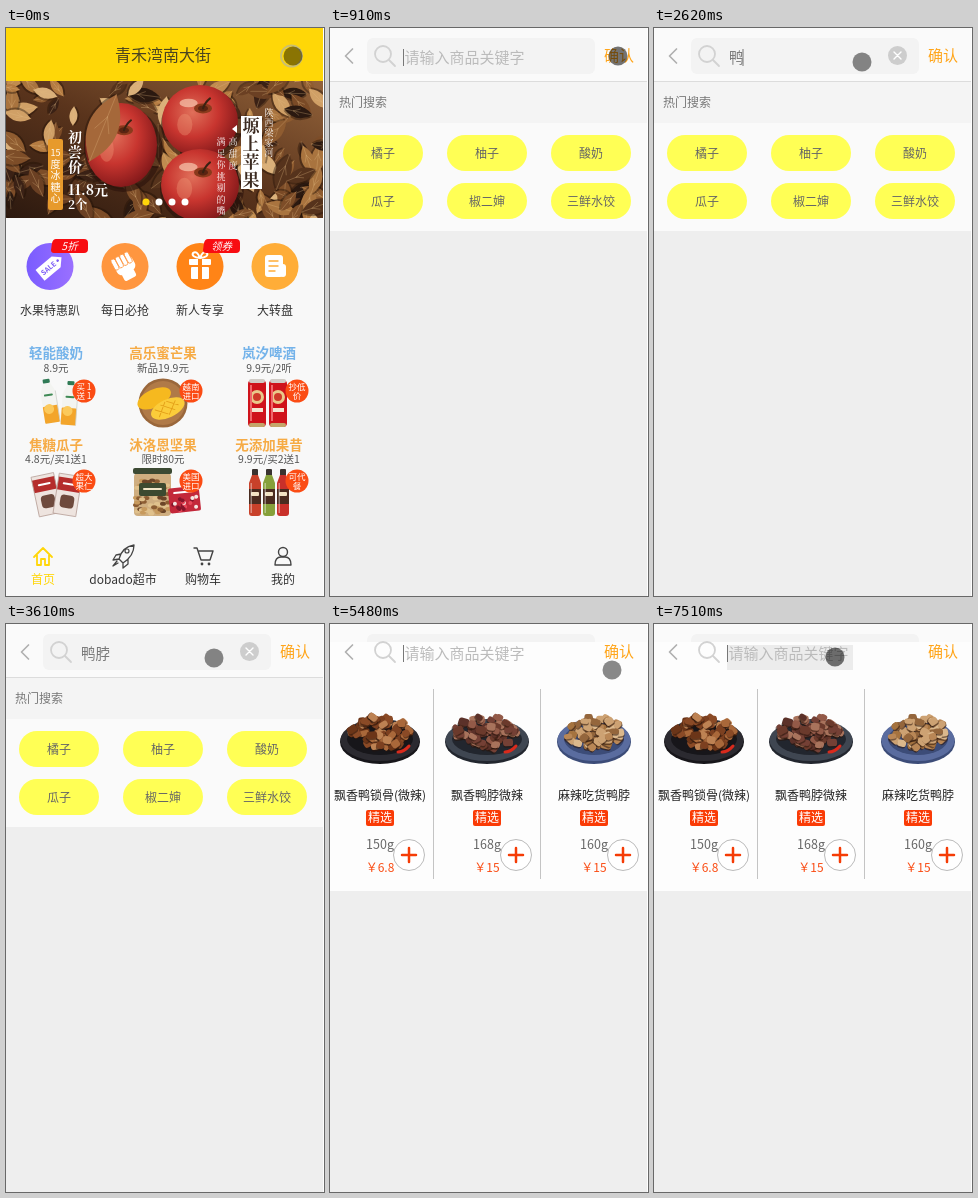
Write an HTML page that moves like this. It is 318 px wide and 568 px high and loops after 8000 ms.

```html
<!DOCTYPE html>
<html lang="zh-CN">
<head>
<meta charset="utf-8">
<style>
html, body { margin: 0; width: 100%; height: 100%; overflow: hidden; background: #eee; }
svg { display: block; width: 318px; height: 568px; font-family: "Noto Sans CJK SC", "Noto Sans CJK", "Noto Sans", sans-serif; }
.serif { font-family: "Noto Serif CJK SC", "Noto Sans CJK SC", "Noto Serif", serif; }
</style>
</head>
<body>
<svg id="stage" viewBox="0 0 318 568"></svg>
<script>
let seed = 7;
const rnd = (a = 0, b = 1) => {
  seed = (seed * 16807) % 2147483647;
  return a + (b - a) * seed / 2147483647;
};
const pick = list => list[Math.floor(rnd(0, list.length))];
const times = (n, fn) => Array.from({ length: n }, (_, i) => fn(i)).join('');

const rect = (x, y, w, h, fill, r = 0, more = '') =>
  `<rect x="${x}" y="${y}" width="${w}" height="${h}" rx="${r}" fill="${fill}" ${more}/>`;
const oval = (x, y, rx, ry, fill, more = '') =>
  `<ellipse cx="${x}" cy="${y}" rx="${rx}" ry="${ry}" fill="${fill}" ${more}/>`;
const disc = (x, y, r, fill, more) => oval(x, y, r, r, fill, more);
const line = (d, color, w = 1.5, fill = 'none') =>
  `<path d="${d}" fill="${fill}" stroke="${color}" stroke-width="${w}" stroke-linecap="round" stroke-linejoin="round"/>`;
const shape = (d, fill) => `<path d="${d}" fill="${fill}"/>`;
// y is the vertical middle of the glyphs
const text = (s, x, y, size, fill, more = '', anchor = 'middle') =>
  `<text x="${x}" y="${y + size * 0.37}" font-size="${size}" fill="${fill}" text-anchor="${anchor}" ${more}>${s}</text>`;
const column = (s, x, y, size, step, fill, more) =>
  [...s].map((c, i) => text(c, x, y + i * step, size, fill, more)).join('');
const turn = (angle, x, y, body) => `<g transform="rotate(${angle} ${x} ${y})">${body}</g>`;
const group = (id, body) => `<g id="${id}">${body}</g>`;

function leaf(x, y, len, angle, fill) {
  const w = len * 0.42;
  return `<g transform="translate(${x} ${y}) rotate(${angle})">` +
    shape(`M${-len} 2Q0 ${-w * 2 + 2} ${len} 2Q0 ${w * 2 + 2} ${-len} 2Z`, '#1d0e0666') +
    shape(`M${-len} 0Q0 ${-w * 2} ${len} 0Q0 ${w * 2} ${-len} 0Z`, fill) +
    line(`M${-len} 0H${len}M${-len / 3} 0l${w} ${-w / 2}M${-len / 3} 0l${w} ${w / 2}`, '#e2b98066', 0.7) + '</g>';
}

function apple(x, y, rx, ry) {
  return oval(x + 2, y + 4, rx + 3, ry + 1, '#2a120a99') + oval(x, y, rx, ry, 'url(#apple)') +
    oval(x - rx * 0.4, y + ry * 0.1, rx * 0.2, ry * 0.3, '#f2a27e55') +
    oval(x - rx * 0.3, y - ry * 0.5, rx * 0.24, ry * 0.12, '#f9cdb4aa') +
    oval(x + 3, y - ry * 0.35, 9, 5, '#8a3a1c') + oval(x + 3, y - ry * 0.35, 5, 3, '#5a2412') +
    line(`M${x + 3} ${y - ry * 0.35}q2 -6 7 -10`, '#3a2212', 2);
}

function banner() {
  const serif = 'class="serif"';
  const bold = serif + ' font-weight="700"';
  const pale = ['#c08c50', '#d0a066', '#a9743f', '#dab07a', '#8f5c30', '#7a4a26', '#b57c42'];
  const dark = ['#3a2115', '#56331c', '#6b4023', '#2b1910', '#7d4d28'];
  const leaves = times(190, () => {
    const x = rnd(-5, 322), y = rnd(48, 195);
    return leaf(x, y, rnd(8, 19), rnd(0, 360), pick(x < 150 && y > 130 ? dark : pale.concat(dark)));
  });
  return `<g clip-path="url(#bannerClip)">` + rect(0, 53, 317, 137, 'url(#soil)') + leaves +
    apple(115, 117, 36, 42) + leaf(97, 100, 36, 112, '#a5683a') +
    apple(194, 93, 38, 36) + apple(194, 157, 39, 36) + '</g>' +
    column('初尝价', 69, 109, 14, 15, '#fff', bold) +
    rect(42, 111, 15, 71, '#e79a2c', 2) +
    text('15', 49.5, 125, 9, '#fff') + column('度冰糖心', 49.5, 136, 10, 11.5, '#fff') +
    text('11.8元', 62, 162, 14, '#fff', bold, 'start') +
    text('2个', 62, 177, 12, '#fff', bold, 'start') +
    rect(235, 88, 21, 73, '#fff') +
    column('塬上苹果', 245, 98, 17, 18, '#3b2a20', bold) +
    column('陕西梁家河', 263, 85, 9, 10, '#fff', serif) +
    column('高甜度', 227, 114, 9, 12, '#fff', serif) +
    column('满足你挑剔的嘴', 215, 114, 9, 11.5, '#fff', serif) +
    shape('M226 101l5 -4v8z', '#fff') +
    times(4, i => disc(140 + 13 * i, 174, 3.5, i ? '#fff' : '#ffd60a'));
}

function menu() {
  const items = [['水果特惠趴', 'url(#violet)'], ['每日必抢', '#ff963f'], ['新人专享', '#ff8417'], ['大转盘', '#ffad38']];
  const flag = (s, x) => shape(`M${x + 5} 211h28q4 0 4 4v6q0 4 -4 4h-30q-3 0 -3 -3l1 -7q1 -4 4 -4z`, '#f80d12') +
    text(s, x + 18.5, 218.5, 10.5, '#fff', 'font-style="italic"');
  return items.map(([name, fill], i) =>
    disc(44 + 75 * i, 238.5, 23.5, fill) + text(name, 44 + 75 * i, 283, 12, '#333')).join('') +
    turn(-40, 44, 239, shape('M31 232h21l7 7l-7 7h-21z', '#fff') +
      text('SALE', 42, 239, 7, '#7d5cf5', 'font-weight="700"') + disc(54, 239, 1.3, '#7d5cf5')) +
    turn(-28, 119, 238, rect(109, 230, 20, 15, '#fff', 5) +
      times(4, i => rect(108.5 + i * 5, 226, 4.6, 12, '#fff', 2.3, 'stroke="#ff963f" stroke-width=".8"')) +
      rect(112, 243, 13, 9, '#fff', 2)) +
    rect(183, 231, 22, 6, '#fff', 1) + rect(185, 239, 18, 12, '#fff', 1) + rect(192, 231, 4, 20, '#ff8417') +
    line('M194 230q-9 -1 -7 -5q4 -3 7 5q3 -8 7 -5q2 4 -7 5', '#fff', 2) +
    rect(259, 227, 18, 22, '#fff', 3) + rect(274, 236, 6, 13, '#fff', 3) +
    line('M263 233h9M263 238h9M263 243h6', '#ffad38', 1.4) +
    flag('5折', 45) + flag('领券', 197);
}

function pictures() {
  const carton = (x, y, angle) => turn(angle, x + 7, y + 20,
    shape(`M${x} ${y + 10}l4 -9h7l4 9v31h-15z`, '#f3f4f1') + rect(x + 4, y - 3, 7, 4, '#2f7a55', 1) +
    rect(x, y + 24, 15, 17, '#f3a52b', 1) + disc(x + 6, y + 27, 5, '#fbc95c') +
    line(`M${x + 4} ${y + 13}h7`, '#3f8a55', 2) + line(`M${x + 15} ${y + 10}v31`, '#cfd2cc', 0.8));
  const can = x => rect(x, 352, 18, 47, '#cf131b', 4) + rect(x + 1, 351, 16, 4, '#d0ccc6', 2) +
    disc(x + 9, 369, 7, '#e9c98a') + disc(x + 9, 369, 4, '#cf3a2a') + rect(x + 3, 380, 12, 4, '#f4e6d2') +
    rect(x + 1, 395, 16, 4, '#c4a66a', 2) + rect(x + 2, 357, 2, 36, '#f0666a');
  const bag = (x, angle) => turn(angle, x + 11, 467, rect(x, 447, 23, 40, '#eee4df', 2) +
    rect(x, 450, 23, 13, '#b52d2c') + rect(x + 5, 467, 14, 13, '#6e4a3d', 4) +
    line(`M${x + 6} 456h11`, '#fff', 2) + line(`M${x} 447v40h23v-40z`, '#b9a29a', 0.8));
  const bottle = (x, fill) => rect(x + 3, 441, 6, 7, '#3a3330', 1) +
    shape(`M${x + 3} 447h6l3 8v30q0 3 -3 3h-6q-3 0 -3 -3v-30z`, fill) +
    rect(x, 461, 12, 15, '#4a2c20') + rect(x + 2, 464, 8, 4, '#f2e3c4', 1) + rect(x + 1.5, 455, 1.5, 30, '#ffffff66');
  const nuts = times(60, () => oval(rnd(130, 163), rnd(452, 486), 3, 2, pick(['#c79a5e', '#8c5d33', '#e0c18c', '#6c4528'])));
  return carton(36, 354, -9) + carton(56, 356, 4) +
    disc(157, 375, 24.5, '#9a673b') + disc(157, 375, 22, '#b07a48') +
    turn(-25, 157, 375, oval(151, 367, 18, 9, '#f6b91f') + oval(159, 382, 18, 9, '#fbcc3a') +
      line('M147 378l10 9M154 376l11 10M161 375l9 8M148 386l11 -11M158 388l11 -10', '#e39f18', 0.9)) +
    can(242) + can(263) + bag(29, -12) + bag(50, 9) +
    rect(128, 445, 37, 43, '#cfae80', 4) + rect(127, 440, 39, 6, '#3c4a33', 2) + nuts +
    rect(133, 455, 27, 13, '#3d4a30', 2) + line('M138 461h17', '#f2e6c8', 2) +
    turn(-6, 179, 472, rect(163, 459, 31, 25, '#c3283a', 2) +
      times(22, () => disc(rnd(166, 191), rnd(469, 482), 2, pick(['#e8485a', '#86142a', '#f3e6e2']))) +
      line('M169 464h18', '#fff', 2)) +
    bottle(243, '#c8412a') + bottle(257, '#86a03a') + bottle(271, '#c9302a');
}

function goods() {
  const blue = '#74b3ea', gold = '#f6ab45';
  const rows = [
    [325, 340, 363, [[50, '轻能酸奶', '8.9元', '买 1', '送 1', blue], [157, '高乐蜜芒果', '新品19.9元', '越南', '进口', gold], [263, '岚汐啤酒', '9.9元/2听', '抄低', '价', blue]]],
    [417, 431, 453, [[50, '焦糖瓜子', '4.8元/买1送1', '超大', '果仁', gold], [157, '沐洛恩坚果', '限时80元', '美国', '进口', gold], [263, '无添加果昔', '9.9元/买2送1', '可代', '餐', gold]]]
  ];
  return pictures() + rows.map(([y1, y2, y3, cells]) => cells.map(([x, name, price, a, b, color]) =>
    text(name, x, y1, 13.5, color, 'font-weight="700"') + text(price, x, y2, 10.5, '#555') +
    disc(x + 28, y3, 11.5, '#fb4c14') + text(a, x + 28, y3 - 4.5, 8.5, '#fff') + text(b, x + 28, y3 + 4.5, 8.5, '#fff')
  ).join('')).join('');
}

function tabs() {
  const ink = '#444';
  return ['首页', 'dobado超市', '购物车', '我的'].map((s, i) =>
    text(s, 37 + 80 * i, 552, 12, i ? '#333' : '#ffd60a')).join('') +
    line('M28 529l9 -9l9 9M31 527v10h4v-6h4v6h4v-10', '#ffd60a', 1.8) +
    line('M113 531q3 -12 15 -14q0 11 -11 18zM115 526l-5 1l-3 5l6 -1M122 531l0 5l-5 4l0 -5M111 533l-4 5l5 -3', ink, 1.3) +
    disc(121, 523, 2, 'none', `stroke="${ink}" stroke-width="1.2"`) +
    line('M188 520h3l4 12h9l3 -9h-14', ink, 1.4) + disc(196, 536, 1.4, ink) + disc(203, 536, 1.4, ink) +
    disc(277, 524, 4.5, 'none', `stroke="${ink}" stroke-width="1.4"`) +
    line('M269 537q0 -8 6 -8h4q6 0 6 8z', ink, 1.4);
}

function home() {
  return rect(0, 0, 318, 568, '#f8f8f8') + rect(0, 0, 317, 53, '#ffd707') +
    text('青禾湾南大街', 157, 27, 16, '#4a4420') +
    disc(285.5, 28, 10.5, 'none', 'stroke="#cbbf70" stroke-width="2"') +
    banner() + menu() + goods() + tabs();
}

function hotList() {
  const words = ['橘子', '柚子', '酸奶', '瓜子', '椒二婶', '三鲜水饺'];
  return rect(0, 53, 317, 1, '#dcdcdc') + rect(0, 54, 317, 41, '#f4f4f4') + rect(0, 95, 317, 108, '#fafafa') +
    text('热门搜索', 9, 75, 12, '#777', '', 'start') +
    words.map((w, i) => {
      const x = 13 + 104 * (i % 3), y = i < 3 ? 107 : 155;
      return rect(x, y, 80, 36, '#ffff55', 18) + text(w, x + 40, y + 19, 12, '#666');
    }).join('');
}

function dish(x, rx, plate, rim, colors, chili) {
  const chunks = times(75, i => {
    const a = rnd(0, 6.283), k = Math.sqrt(rnd());
    const cx = x + Math.cos(a) * k * rx * 0.74, cy = 108 + Math.sin(a) * k * 16;
    const w = rnd(7, 11), h = rnd(5, 8);
    return turn(rnd(-50, 50), cx, cy, rect(cx - w / 2, cy - h / 2 + 1.5, w, h, '#2a140c88', 2.5) +
      rect(cx - w / 2, cy - h / 2, w, h, pick(colors), 2.5));
  });
  return oval(x, 118, rx, 22, rim) + oval(x, 116, rx - 0.5, 21, plate) + oval(x, 115, rx - 7, 16, rim) + chunks +
    (chili ? line(`M${x + 18} 128q6 0 11 -6`, '#d92a1c', 3) : '');
}

function results() {
  const cells = [
    ['飘香鸭锁骨(微辣)', '150g', '6.8', 40, '#2b2a30', '#17161a', ['#8a4a26', '#6b3518', '#a9683a', '#7c4020', '#bd8253'], true],
    ['飘香鸭脖微辣', '168g', '15', 42, '#3f4651', '#22262e', ['#744035', '#5b3129', '#935a48', '#6b3a2c', '#a8735c'], true],
    ['麻辣吃货鸭脖', '160g', '15', 37, '#5a6c9f', '#3c4c78', ['#b98756', '#94663c', '#cda273', '#a5733f', '#dbb88c'], false]
  ];
  return rect(0, 54, 317, 213, '#fdfdfd') +
    cells.map(([name, weight, price, rx, plate, rim, colors, chili], i) => {
      const x = 50 + 107 * i;
      return dish(x, rx, plate, rim, colors, chili) +
        text(name, x, 172, 12, '#222') +
        rect(x - 14, 186, 28, 16, '#fa3b06', 2) + text('精选', x, 194, 12, '#fff') +
        text(weight, x, 220, 12.5, '#666') + text('￥' + price, x, 244, 12, '#fa4b12') +
        disc(x + 29, 231, 15.5, '#fff', 'stroke="#bbb"') +
        line(`M${x + 22} 231h14M${x + 29} 224v14`, '#f53c06', 2.5) +
        (i < 2 ? rect(x + 53, 65, 1, 190, '#c4c4c4') : '');
    }).join('');
}

const emptyNote = () =>
  text('喵~ 这是啥 T.T 你再搜搜~', 163, 285, 12, '#888') +
  rect(109, 329, 96, 36, '#f2e40e', 18) + text('点我逛嗨', 157, 347.5, 15, '#fff');

const search = () =>
  rect(0, 0, 318, 568, '#eee') + rect(0, 0, 317, 53, '#fafafa') + rect(37, 10, 228, 36, '#f3f3f3', 6) +
  group('hot', hotList()) + group('empty', emptyNote()) +
  group('results', rect(0, 18, 317, 40, '#fdfdfd') + results()) +
  group('tap', rect(73, 21, 126, 25, '#ececec')) +
  line('M22.5 21l-7 7l7 7', '#b0b0b0', 1.7) +
  disc(53, 26, 8, 'none', 'stroke="#d2d2d2" stroke-width="1.8"') + line('M59 32l6 6', '#d2d2d2', 1.8) +
  text('确认', 289, 27, 15, '#ffa51a') +
  group('hint', text('请输入商品关键字', 74.5, 29.5, 15, '#bbb', 'font-weight="300"', 'start')) +
  `<text id="query" x="75" y="34.5" font-size="14.5" fill="#777" font-weight="300"></text>` +
  group('clear', disc(243.5, 27.5, 9.5, '#cdcdcd') + line('M240 24l7 7M247 24l-7 7', '#fff', 1.4)) +
  rect(73, 21, 1, 17, '#777', 0, 'id="caret"');

const stop = (at, color) => `<stop offset="${at}" stop-color="${color}"/>`;
const $ = id => document.getElementById(id);
$('stage').innerHTML = `<defs>
  <clipPath id="bannerClip"><rect y="53" width="317" height="137"/></clipPath>
  <linearGradient id="soil" x1="0" y1="1" x2="1" y2="0">${stop(0, '#2c190f') + stop(0.5, '#5a341c') + stop(1, '#93633a')}</linearGradient>
  <radialGradient id="apple" cx=".4" cy=".38" r=".68">${stop(0, '#e0705a') + stop(0.5, '#c8352f') + stop(1, '#7d1618')}</radialGradient>
  <linearGradient id="violet">${stop(0, '#7a5cff') + stop(1, '#9a70ff')}</linearGradient>
  </defs>` + group('home', home()) + group('search', search()) +
  rect(317, 0, 1, 568, '#fff') + disc(0, 0, 9.5, '#000', 'id="pointer"');

// each step: time, then only what changes
const steps = [
  [0, { page: 'home', query: '', caret: 0, at: [287, 28], press: 0 }],
  [510, { press: 1 }],
  [910, { page: 'hot', caret: 1, at: [288, 28] }],
  [1170, { caret: 0, at: [288, 37], press: 0 }],
  [1290, { at: [250, 37] }],
  [1420, { at: [208, 34] }],
  [1670, { caret: 1 }],
  [2120, { caret: 0 }],
  [2620, { query: '鸭', caret: 1 }],
  [3050, { query: '鸭脖' }],
  [3610, { caret: 0 }],
  [3860, { at: [238, 33] }],
  [3980, { at: [296, 39] }],
  [4120, { at: [294, 37], caret: 1 }],
  [4270, { press: 1 }],
  [4580, { page: 'empty', caret: 0 }],
  [4710, { page: 'results', query: '', caret: 1, press: 0 }],
  [5110, { caret: 0 }],
  [5480, { caret: 1, at: [282, 46] }],
  [5600, { at: [260, 85] }],
  [5750, { at: [202, 147] }],
  [5900, { at: [154, 188] }],
  [6050, { caret: 0 }],
  [6170, { at: [200, 150] }],
  [6290, { at: [262, 100] }],
  [6410, { at: [225, 72] }],
  [6530, { caret: 1, at: [181, 66] }],
  [6680, { at: [182, 45] }],
  [6800, { at: [181, 33], press: 1 }],
  [7050, { caret: 0 }],
  [7510, { caret: 1 }]
];
const LOOP = 8000;

const show = (id, on) => { $(id).style.display = on ? '' : 'none'; };

function draw(t) {
  const s = Object.assign({}, ...steps.filter(([at]) => at <= t).map(([, change]) => change));
  show('home', s.page === 'home');
  show('search', s.page !== 'home');
  show('hot', s.page === 'hot' || s.page === 'empty');
  show('empty', s.page === 'empty');
  show('results', s.page === 'results');
  show('tap', s.page === 'results' && s.press);
  show('hint', !s.query);
  show('clear', s.query);
  show('caret', s.caret);
  $('query').textContent = s.query;
  $('caret').setAttribute('x', s.query ? 74 + 14.5 * s.query.length : 73);
  $('pointer').setAttribute('transform', `translate(${s.at})`);
  $('pointer').setAttribute('fill-opacity', s.press ? 0.54 : 0.46);
}

const start = performance.now();
function tick() {
  draw((performance.now() - start) % LOOP);
  requestAnimationFrame(tick);
}
tick();
</script>
</body>
</html>
```
